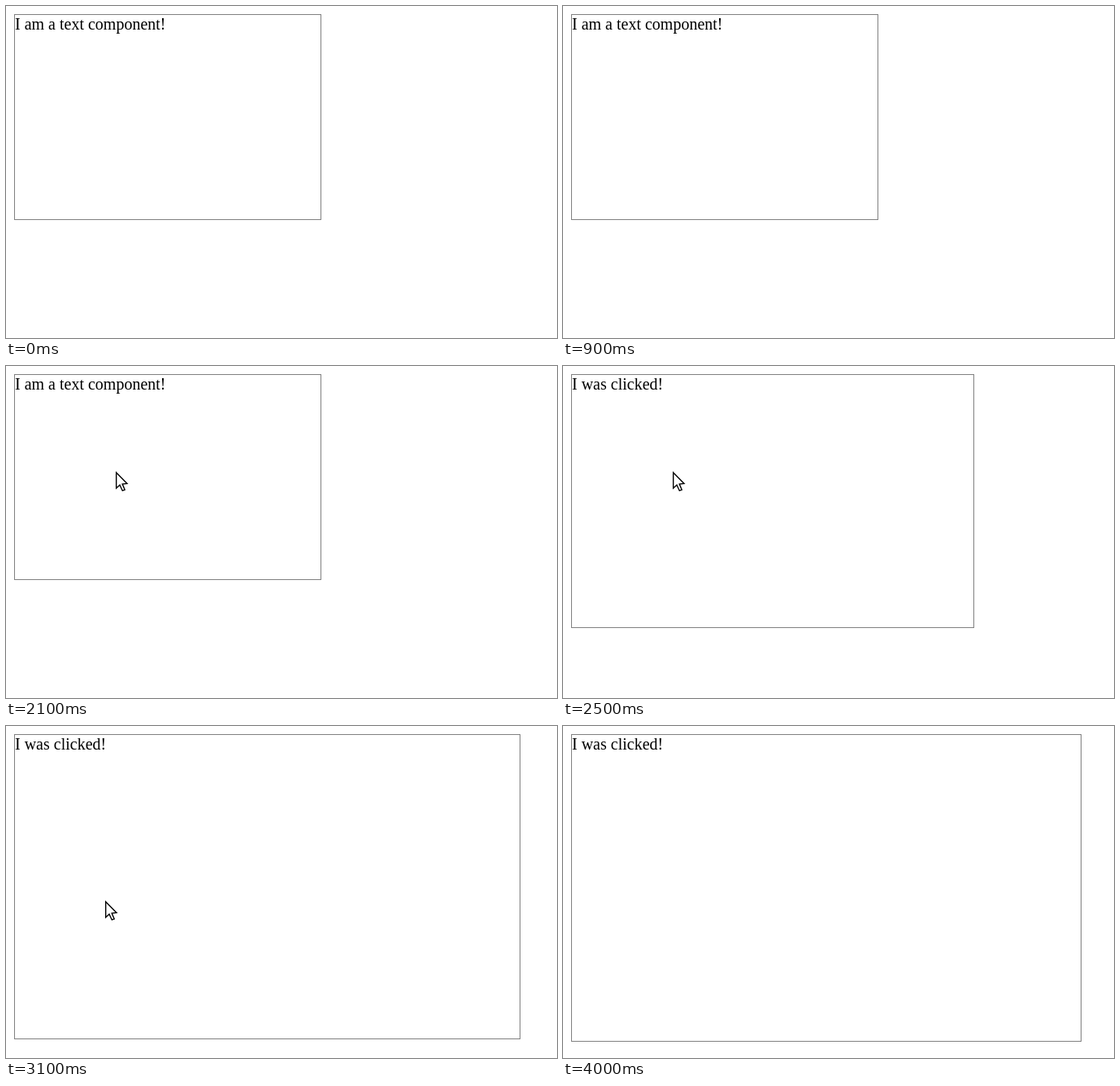
An HTML page for the animation above (4.3 s loop, 678x408 px).

```html
<!DOCTYPE html>
<html lang="en">
<head>
<meta charset="utf-8">
<title>Clickable text component</title>
<style>
  html, body { margin: 0; width: 100%; height: 100%; overflow: hidden; background: #fff; }
  #box {
    position: absolute; left: 10px; top: 10px; box-sizing: border-box;
    border: 1px solid #808080; color: #000;
    font: 20px/23px "Liberation Serif", "Times New Roman", serif; white-space: nowrap;
  }
  #cursor { position: absolute; left: 0; top: 0; overflow: visible; }
</style>
</head>
<body>
<div id="box"></div>
<svg id="cursor" width="16" height="25">
  <path d="M.7 1V20.2L5 16.2L8.3 23.2L11.2 22.2L8.2 15L14 14.5Z" fill="#fff" stroke="#000" stroke-width="1.4"/>
</svg>
<script>
const LOOP = 4300, STEP = 100, CLICK = 2187, GROW = 1120;
const box = document.getElementById("box");
const cursor = document.getElementById("cursor");

// Pointer path: [time, x, y]
const path = [
  [1500, 121, 329], [1600, 125, 262], [1700, 129, 206], [1800, 132, 165],
  [1900, 134, 140], [2000, 135, 130], [3000, 135, 130], [3100, 122, 215], [3200, 107, 386]
];

const mix = (a, b, k) => a + (b - a) * k;

// CSS "ease": cubic-bezier(.25, .1, .25, 1)
function ease(x) {
  if (x <= 0) return 0;
  if (x >= 1) return 1;
  let lo = 0, hi = 1;
  for (let i = 0; i < 24; i++) {
    const s = (lo + hi) / 2;
    if (.75 * s - .75 * s * s + s ** 3 < x) lo = s; else hi = s;
  }
  return .3 * lo * (1 - lo) ** 2 + 3 * (1 - lo) * lo * lo + lo ** 3;
}

function moveCursor(t) {
  const i = path.findLastIndex(p => p[0] <= t);
  const shown = i >= 0 && t < 3300;
  cursor.style.visibility = shown ? "visible" : "hidden";
  if (!shown) return;
  const a = path[i], b = path[i + 1] || a;
  const k = b === a ? 0 : (t - a[0]) / (b[0] - a[0]);
  const x = Math.round(mix(a[1], b[1], k)), y = Math.round(mix(a[2], b[2], k));
  cursor.style.transform = `translate(${x}px, ${y}px)`;
}

function draw(now) {
  const t = Math.floor((now % LOOP) / STEP) * STEP;
  const k = ease((t - CLICK) / GROW);
  box.style.width = Math.round(mix(378, 628, k)) + "px";
  box.style.height = Math.round(mix(253, 378, k)) + "px";
  box.textContent = t < CLICK ? "I am a text component!" : "I was clicked!";
  moveCursor(t);
}

const start = performance.now();
function tick() {
  draw(performance.now() - start);
  requestAnimationFrame(tick);
}
tick();
</script>
</body>
</html>
```
